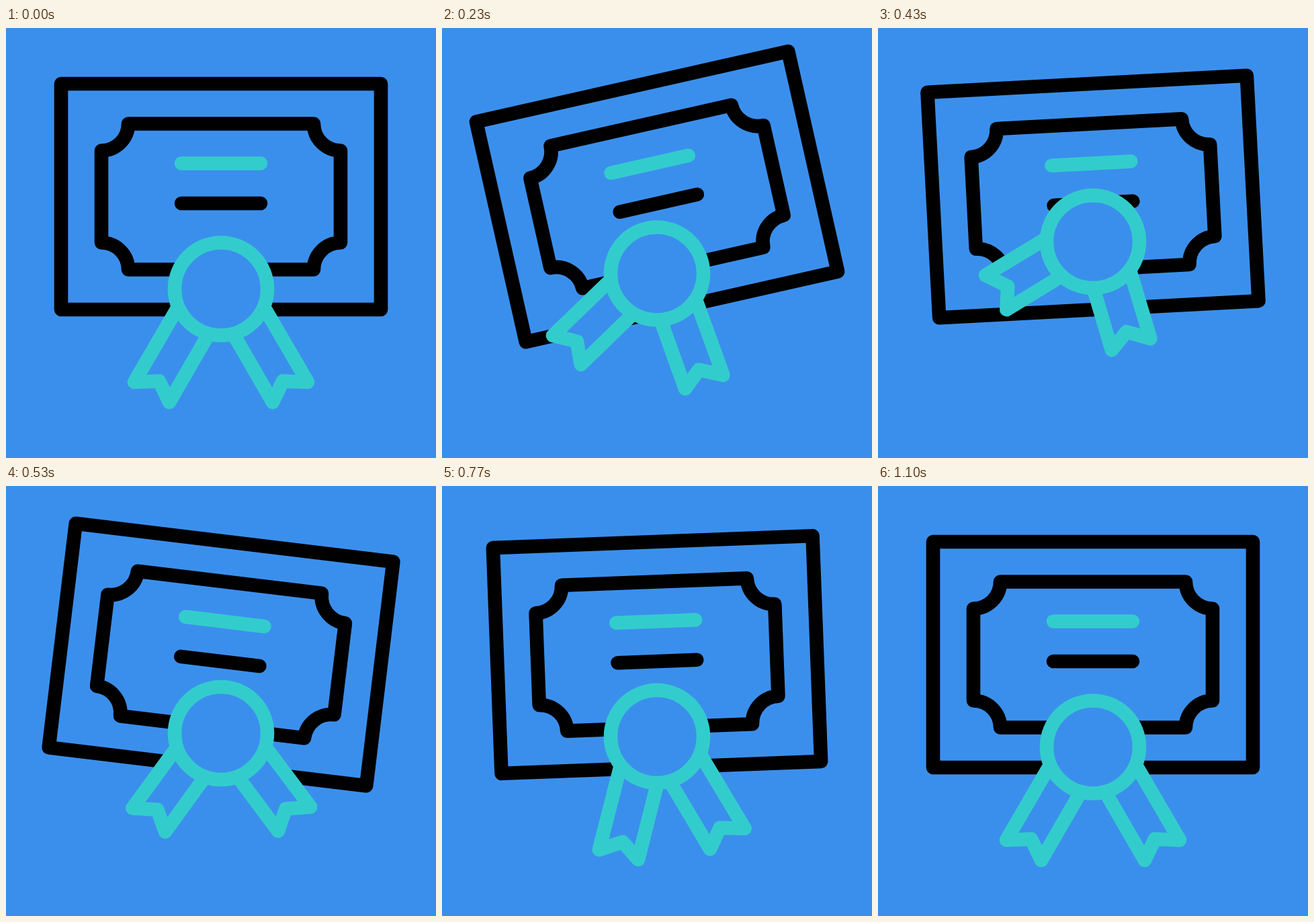
These frames come from a looping animation (640 by 640 pixels, 1.67 s). An HTML page with a canvas:

```html
<!DOCTYPE html>
<html lang="en">
<head>
<meta charset="utf-8">
<title>Certificate</title>
<style>
  html, body { margin: 0; width: 100%; height: 100%; overflow: hidden; background: #3b8fec; }
  canvas { display: block; width: 100vw; height: 100vh; }
</style>
</head>
<body>
<canvas id="stage" width="640" height="640"></canvas>
<script>
const ctx = document.getElementById('stage').getContext('2d');
const BLUE = '#3b8fec', TEAL = '#33cccc', BLACK = '#000';
const LOOP = 1670, START = 4, END = 33; // START and END in steps of 1/30 s

const ease = p => (1 - Math.cos(Math.PI * p)) / 2;
const mix = (a, b, p) => a + (b - a) * ease(p);

// Eases from rest through the turning points [step, value] and back to rest
function through(n, ...turns) {
  let [from, a] = [START, 0];
  if (n <= from) return 0;
  for (const [to, b] of [...turns, [END, 0]]) {
    if (n < to) return mix(a, b, (n - from) / (to - from));
    [from, a] = [to, b];
  }
  return 0;
}

// Leans left, then rocks back in four shrinking half swings
function tilt(n) {
  const lean = 10, half = 5.55;
  if (n < lean) return mix(0, -16, n / lean);
  const peak = k => k < 4 ? -16 * (-1) ** k / (1 + 0.315 * k) ** 3 : 0;
  const u = (n - lean) / half, k = Math.floor(u);
  return mix(peak(k), peak(k + 1), u - k);
}

const lift = n => through(n, [12, -74.5], [20, 33.5], [25.5, -52.5]);
const leftSwing = n => through(n, [10.5, 36], [21, -20], [28.5, 5]);
const rightSwing = n => through(n, [10.5, 23.5], [17.2, -9.2], [28.5, 7.1]);

// How far the ribbons slip behind the medal
function tuck(n) {
  const p = Math.min(1, Math.max(0, (n - 2.5) / 20.5));
  return 22 * Math.sin(Math.PI * p) ** 2;
}

function stroke(color) {
  ctx.strokeStyle = color;
  ctx.stroke();
}

function fillAndStroke() {
  ctx.fillStyle = BLUE;
  ctx.fill();
  stroke(TEAL);
}

function placed(x, y, angle, paint) {
  ctx.save();
  ctx.translate(x, y);
  ctx.rotate(angle * Math.PI / 180);
  paint();
  ctx.restore();
}

function bar(y, color) {
  ctx.beginPath();
  ctx.moveTo(-59, y);
  ctx.lineTo(59, y);
  stroke(color);
}

function certificate() {
  ctx.beginPath();
  ctx.rect(-238, -168, 476, 336);
  stroke(BLACK);

  // Inner border with scooped corners
  const w = 178, h = 108.5, q = Math.PI / 2;
  ctx.beginPath();
  for (let i = 0; i < 4; i++) {
    const x = i === 1 || i === 2 ? w : -w;
    const y = i < 2 ? -h : h;
    ctx.arc(x, y, 40, (i + 1) * q, i * q, true);
  }
  ctx.closePath();
  stroke(BLACK);

  bar(-49.5, TEAL);
  bar(10, BLACK);
}

function ribbon(side, slide) {
  ctx.scale(side, 1);
  ctx.translate(-0.557 * slide, -0.83 * slide);
  ctx.beginPath();
  ctx.moveTo(60, 20);
  ctx.lineTo(129, 138.5);
  ctx.lineTo(92, 137);
  ctx.lineTo(77, 168.5);
  ctx.lineTo(12, 56);
  fillAndStroke();
}

function medal(n) {
  const slide = tuck(n);
  placed(0, 0, leftSwing(n), () => ribbon(-1, slide));
  placed(0, 0, rightSwing(n), () => ribbon(1, slide));
  ctx.beginPath();
  ctx.arc(0, 0, 69, 0, 2 * Math.PI);
  fillAndStroke();
}

function draw(ms) {
  // Steps fall on whole hundredths of a second
  const t = Math.floor((ms % LOOP) / 10) * 10;
  const n = Math.min(END, Math.floor(t * 0.03 + 0.15));
  ctx.fillStyle = BLUE;
  ctx.fillRect(0, 0, 640, 640);
  placed(320, 251, tilt(n), certificate);
  placed(320, 388.5 + lift(n), 0, () => medal(n));
}

ctx.lineWidth = 20.6;
ctx.lineCap = ctx.lineJoin = 'round';

const start = performance.now();
function tick() {
  draw(performance.now() - start);
  requestAnimationFrame(tick);
}
tick();
</script>
</body>
</html>
```
